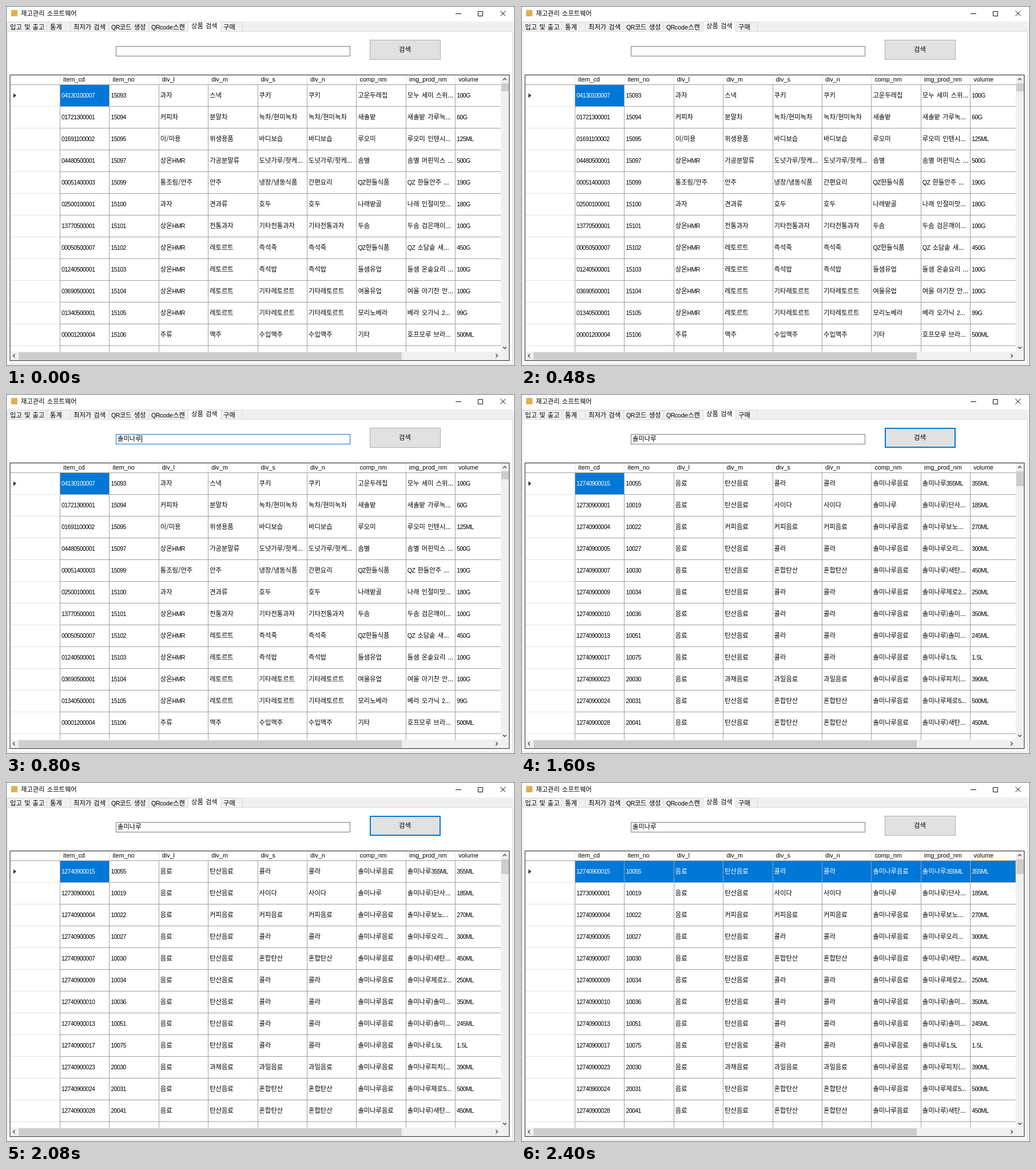
An HTML page for the animation above (3200 ms loop, 890 by 629 pixels).

```html
<!DOCTYPE html>
<html lang="ko">
<head>
<meta charset="utf-8">
<title>재고관리 소프트웨어</title>
<style>
  html, body { margin: 0; width: 100%; height: 100%; overflow: hidden; background: #fff; }
  svg { display: block; width: 890px; height: 629px; }
  text { font: 11.3px "Noto Sans CJK KR", "Noto Sans CJK", sans-serif; word-spacing: 1px; fill: #000; }
  tspan { font: 10.8px "Liberation Sans", sans-serif; }
  .caps { font-size: 10.6px; letter-spacing: -.6px; }
  .picked, [data-step="3"] .top { fill: #fff; }
</style>
</head>
<body>
<svg id="stage" viewBox="0 0 890 629" data-step="0"></svg>
<script>
const stage = document.getElementById('stage');
const STEP = 800, STEPS = 4;
const COL = 86.4, ROW = 38, LEFT = 94.5, TOP = 137, RIGHT = 865, BOTTOM = 604;
const BLUE = '#0078d7', LINE = '#a0a0a0', PALE = '#e3e3e3', FACE = '#f0f0f0', THUMB = '#cdcdcd';

function add(tag, attrs, parent = stage) {
  const el = document.createElementNS('http://www.w3.org/2000/svg', tag);
  for (const k in attrs) el.setAttribute(k, attrs[k]);
  return parent.appendChild(el);
}
const box = (x, y, w, h, fill, parent) => add('rect', { x, y, width: w, height: h, fill }, parent);
const frame = (x, y, w, h, stroke, fill = 'none', width = 1) =>
  add('rect', { x, y, width: w, height: h, stroke, fill, 'stroke-width': width });
const path = (d, stroke, width = 1) => add('path', { d, stroke, 'stroke-width': width, fill: 'none' });

// Latin runs are narrower than Hangul, so they get their own spans.
function label(x, y, str, cls = '', parent = stage) {
  const t = add('text', { x, y, class: cls }, parent);
  t.innerHTML = str.replace(/[A-Z\d]+|[a-z_]+/g, s =>
    `<tspan class="${/[a-z_]/.test(s) ? 'low' : 'caps'}">${s}</tspan>`);
  return t;
}

const brand = '솔미나루', maker = brand + '음료';
const heads = 'item_cd item_no div_l div_m div_s div_n comp_nm img_prod_nm volume'.split(' ');
const allItems = `
04130100007|15093|과자|스낵|쿠키|쿠키|고운두레집|모누 세미 스위...|100G
01721300001|15094|커피차|분말차|녹차/현미녹차|녹차/현미녹차|새솔밭|새솔밭 가루녹...|60G
01691100002|15095|이/미용|위생용품|바디보습|바디보습|루오미|루오미 인텐시...|125ML
04480500001|15097|상온HMR|가공분말류|도넛가루/핫케...|도넛가루/핫케...|솜별|솜별 머핀믹스 ...|500G
00051400003|15099|통조림/안주|안주|냉장/냉동식품|간편요리|QZ한들식품|QZ 한들안주 ...|190G
02500100001|15100|과자|견과류|호두|호두|나래밭골|나래 인절미맛...|180G
13770500001|15101|상온HMR|전통과자|기타전통과자|기타전통과자|두솜|두솜 검은깨이...|100G
00050500007|15102|상온HMR|레토르트|즉석죽|즉석죽|QZ한들식품|QZ 소담솥 새...|450G
01240500001|15103|상온HMR|레토르트|즉석밥|즉석밥|들샘유업|들샘 온솥요리 ...|100G
03690500001|15104|상온HMR|레토르트|기타레토르트|기타레토르트|여울유업|여울 아기찬 안...|100G
01340500001|15105|상온HMR|레토르트|기타레토르트|기타레토르트|모리노베라|베라 오가닉 2...|99G
00001200004|15106|주류|맥주|수입맥주|수입맥주|기타|호프모루 브라...|500ML`;
const foundItems = `
12740900015|10055|음료|탄산음료|콜라|콜라|${maker}|${brand}355ML|355ML
12730900001|10019|음료|탄산음료|사이다|사이다|${brand}|${brand})단사...|185ML
12740900004|10022|음료|커피음료|커피음료|커피음료|${maker}|${brand}보노...|270ML
12740900005|10027|음료|탄산음료|콜라|콜라|${maker}|${brand}오리...|300ML
12740900007|10030|음료|탄산음료|혼합탄산|혼합탄산|${maker}|${brand})새탄...|450ML
12740900009|10034|음료|탄산음료|콜라|콜라|${maker}|${brand}제로2...|250ML
12740900010|10036|음료|탄산음료|콜라|콜라|${maker}|${brand})솔미...|350ML
12740900013|10051|음료|탄산음료|콜라|콜라|${maker}|${brand})솔미...|245ML
12740900017|10075|음료|탄산음료|콜라|콜라|${maker}|${brand}1.5L|1.5L
12740900023|20030|음료|과채음료|과일음료|과일음료|${maker}|${brand}피치(...|390ML
12740900024|20031|음료|탄산음료|혼합탄산|혼합탄산|${maker}|${brand}제로5...|500ML
12740900028|20041|음료|탄산음료|혼합탄산|혼합탄산|${maker}|${brand})새탄...|450ML`;

function fillRows(items) {
  const g = add('g', {});
  items.trim().split('\n').forEach((line, r) => line.split('|').forEach((str, c) =>
    label(97 + c * COL, TOP + 23 + r * ROW, str, r ? '' : c ? 'top' : 'picked', g)));
  return g;
}

// Window and title bar
box(0, 0, 890, 629, '#fff');
box(1, 27, 888, 601, FACE);
box(9, 7, 11, 11, '#e3b04b');
label(26, 17, '재고관리 소프트웨어');
path('M786 13.5h10M825.5 9.5h8v8h-8zM864.5 8.5l9 9m0-9l-9 9', '#111');

// Tabs
const tabs = [
  [2, 71, '입고 및 출고', 7], [71, 112, '통계', 77], [112, 179, '최저가 검색', 118],
  [179, 249, 'QR코드 생성', 184], [249, 318, 'QRcode스캔', 254], [375, 413, '구매', 380]
];
for (const [a, b, name, x] of tabs) {
  frame(a + .5, 28.5, b - a, 17, '#d9d9d9', FACE);
  label(x, 41, name);
}
frame(2.5, 44.5, 883, 581, '#dcdcdc', '#fff');
box(318, 27, 58, 19, '#fff');
path('M318.5 45V27.5H375.5V45', '#d9d9d9');
label(324, 39, '상품 검색');

// Search field and button
const field = frame(192.5, 70.5, 409, 17, '#7a7a7a', '#fff');
const query = label(195, 82, brand);
const caret = box(237, 72, 1, 13, '#000');
frame(636.5, 59.5, 123, 34, '#adadad', '#e1e1e1');
const ring = frame(637, 60, 122, 33, BLUE, 'none', 2);
label(697.5, 80, '검색').setAttribute('text-anchor', 'middle');

// Grid
const cell = box(LEFT, TOP, COL, ROW, BLUE);
const bar = box(LEFT, TOP, RIGHT - LEFT, ROW, BLUE);
let pale = '', dark = `M8 ${TOP + .5}H${RIGHT}`;
for (let c = 0; c < 9; c++) {
  const x = Math.floor(LEFT + c * COL) + .5;
  pale += `M${x} 121V${TOP}`;
  dark += `M${x} ${TOP}V${BOTTOM}`;
  label(100 + c * COL, 132, heads[c]);
}
for (let r = 1; r <= 12; r++) {
  const y = TOP + r * ROW + .5;
  pale += `M8 ${y}H94`;
  dark += `M95 ${y}H${RIGHT}`;
}
path(pale, PALE);
path(dark, LINE);
add('path', { d: 'M13 152.5l5 4-5 4z', fill: '#333' });
const before = fillRows(allItems), after = fillRows(foundItems);
const cue = frame(786.5, 137.5, 78, 37, '#a86a3c');
cue.setAttribute('stroke-dasharray', '1 1');

// Scroll bars
box(RIGHT, 121, 15, 498, FACE);
box(8, BOTTOM, 872, 15, FACE);
const thumb = box(866, 135, 13, 14, THUMB);
box(22, 605, 670, 13, THUMB);
path('M869 129.5l3-3 3 3M869 595.5l3 3 3-3M15.5 608l-3 3 3 3M856.5 608l3 3-3 3', '#444', 1.4);
frame(7, 120.5, 873, 499, '#3c3c3c', 'none', 1.2);
frame(.5, .5, 889, 628, '#707070');

// Each part with the steps in which it shows
const shown = [
  [before, '1100'], [after, '0011'], [cell, '1110'], [bar, '0001'], [cue, '0001'],
  [query, '0111'], [caret, '0100'], [ring, '0010']
];

function show(step) {
  for (const [el, on] of shown) el.style.display = on[step] === '1' ? '' : 'none';
  stage.dataset.step = step;
  field.setAttribute('stroke', step === 1 ? BLUE : '#7a7a7a');
  thumb.setAttribute('height', step < 2 ? 14 : 26);
}

const start = performance.now();
let last = -1;
function tick() {
  const step = Math.floor((performance.now() - start) / STEP) % STEPS;
  if (step !== last) show(last = step);
  requestAnimationFrame(tick);
}
tick();
</script>
</body>
</html>
```
